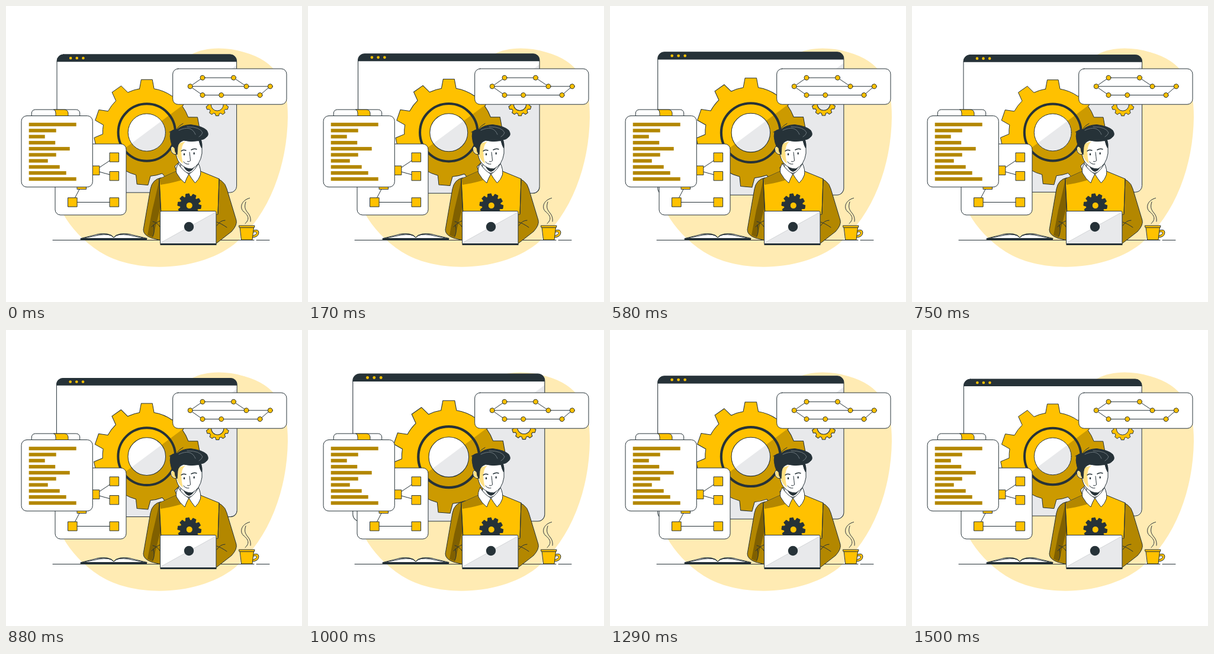
Animation, 500 px wide and 500 px high, one loop 1.54 s. Source, as an HTML page:

```html
<!DOCTYPE html>
<html lang="en">
<head>
<meta charset="utf-8">
<title>Developer at work</title>
<style>
html, body { margin: 0; width: 100%; height: 100%; overflow: hidden; background: #fff; }
svg { display: block; width: 100%; height: 100%; }
.ln { stroke: #263238; stroke-width: 1; stroke-linejoin: round; stroke-linecap: round; }
.w { fill: #fff; }
.y { fill: #ffc100; }
.o { fill: #b38700; }
.d { fill: #263238; }
.g { fill: #e8e9eb; }
.n { fill: none; }
</style>
</head>
<body>
<svg viewBox="0 0 500 500">
  <defs>
    <clipPath id="shade"><path d="M389.8 99.5L100 315.3H390z"/></clipPath>
  </defs>
  <path fill="#ffebb3" d="M313 82C335 70 368 68 402 78C456 93 477 128 476 188C475 268 446 352 386 402C326 449 218 453 158 415C130 397 109 373 97 352L200 150z"/>
  <path class="ln n" d="M79 395.5H419M423 395.5H445"/>

  <g id="window">
    <rect class="w" x="85.8" y="81.7" width="304" height="233.6" rx="11"/>
    <path class="g" d="M389.8 99.5L100 315.3H378.8a11 11 0 0 0 11-11z"/>
    <path class="d" d="M85.8 94V92.7a11 11 0 0 1 11-11H378.8a11 11 0 0 1 11 11V94z"/>
    <rect class="ln n" x="85.8" y="81.7" width="304" height="233.6" rx="11"/>
    <g class="y"><circle cx="109" cy="87.8" r="2.3"/><circle cx="119.6" cy="87.8" r="2.3"/><circle cx="130.3" cy="87.8" r="2.3"/></g>
    <path class="y" data-gear="big"/>
    <path fill="#cc9a00" data-gear="big" clip-path="url(#shade)"/>
    <path class="ln n" data-gear="big"/>
    <circle class="n" cx="237.8" cy="213.6" r="48.3" stroke="#263238" stroke-width="4"/>
    <circle class="w" cx="237.8" cy="213.6" r="31.7"/>
    <circle class="g" cx="237.8" cy="213.6" r="31.7" clip-path="url(#shade)"/>
    <circle class="ln n" cx="237.8" cy="213.6" r="31.7"/>
    <path class="ln y" data-gear="small"/>
    <circle class="ln g" cx="357" cy="166.5" r="10.5"/>
  </g>

  <g class="ln">
    <rect class="w" x="83" y="233" width="120" height="120" rx="9"/>
    <path class="n" d="M183 256L150 278L183 287M150 278L128 302L112.5 331.5H183"/>
    <g class="y" id="boxes"></g>
  </g>

  <g class="ln">
    <path class="w" d="M43.3 187V181a6 6 0 0 1 6-6H118.7a6 6 0 0 1 6 6V187z"/>
    <path class="y" d="M81 175H99a6 6 0 0 1 6 6V187H84V181Q84 176 81 175z"/>
    <rect class="w" x="26" y="185.5" width="120.3" height="120.3" rx="9"/>
  </g>
  <g class="o" id="bars"></g>

  <g class="ln">
    <rect class="w" x="281.7" y="106" width="192.3" height="60.2" rx="9"/>
    <path class="n" d="M446 135.8H311L332 121.2H384.5L406 135.8M311 135.8L332 150.5H429L446 135.8"/>
    <g class="y" id="nodes"></g>
  </g>

  <g class="ln">
    <path class="w" d="M127 392.5L153 386Q176 382 182 391Q188 382 211 386L238 392.5z"/>
    <path class="n" d="M132 392L157 387Q176 384 182 391Q188 384 207 387L232 392M154 385.5Q174 382 182 391Q190 382 210 385.5"/>
    <path class="d" d="M126.5 392.5H237.5V395H126.5z"/>
  </g>

  <g class="ln">
    <path class="y" d="M417 379.5Q427 375.5 427 383Q426 391 415.5 391L416 388Q422.5 387 423.3 383.5Q423 380 416.7 382.5z"/>
    <path class="y" d="M395.5 374H418.5L416 395H398z"/>
    <path class="y" d="M393.7 371H420L419.3 374.3H394.4z"/>
    <path class="n" d="M411.5 324.5C398 328 394 340 401 347C411 355 411 361 404 367.5M405 331C402 340 404 344 409 350C413 355 413.5 360 413 364"/>
  </g>

  <g class="ln">
    <path class="o" d="M262 290Q247 293 244 309L232 378Q232 387 246 392L262 396L275 330z"/>
    <path fill="#806000" stroke="none" d="M259 293Q252 325 247 345L239 387L248 391L261 340z"/>
    <path class="o" d="M345 288Q369 292 373 309L389 362Q391 370 381 381L354 402L348 340z"/>
    <path class="y" d="M259 292L290 278Q308 290 326 278L360 292L358 352H262z"/>
    <path class="o" stroke="none" d="M259.5 292L290 278L307 290Q292 297 261 302z"/>
    <path class="n" d="M259 292L262 350M360 292L358 350"/>
    <path class="n" d="M248 364Q256 366 260 373M246 373Q254 365 260 363M249 370Q252 382 248 389M370 362Q362 362 356 371M373 374Q363 367 356 365"/>
    <path class="d" data-gear="chest"/>
    <circle class="y" cx="309.8" cy="337" r="5.6"/>

    <path class="w" d="M297 256L294 276Q308 288 322 277L324 256z"/>
    <path class="d" d="M299 267Q309 274 320 266Q316 279 309 279.5Q302 278 299 267z"/>
    <path class="w" d="M291 266Q286 275 288 282Q294 293 302 299Q305 290 309 284Q297 277 291 266z"/>
    <path class="w" d="M325 266Q330 276 328.5 285Q326 293 319.5 299Q313 291 309 284Q320 277 325 266z"/>
    <path class="w" d="M287 238Q278 235 278.5 242Q279 250 287 251z"/>
    <path class="w" d="M288 222H329Q332 236 331 249Q328 269 314 275Q303 276 293 265Q287 257 287 246z"/>
    <path fill="#ffe083" stroke="none" d="M289 233L303 229Q292 238 299 266Q290 260 288 249zM287 239Q279.5 236 279.5 242Q280 249 287 250z"/>
    <path class="d" d="M278 212Q283 208 290 208Q297 201 312 200.5Q332 203 339 210Q343 216 340 220Q335 226 329 226Q332 232 330.5 240Q328 236 326 227.5Q312 230 300 227Q291 230 290 238L289 251Q285 247 285 240Q280 237 278.5 229Q276 220 278 212z"/>
    <path class="n" d="M276 213Q286 211 299 204M289 207Q292 202 299 198.5M281 210L279 214"/>
    <path fill="none" stroke="#8d979d" stroke-width=".7" d="M292 210Q313 200 320 217M306 204Q328 204 332 214Q331 218 326 221"/>
    <path class="n" d="M310 247Q311 255 311.5 261Q310 264 306.5 262.5M300 263Q303 268 309 267"/>
    <path class="n" stroke-width="1.5" d="M296 245Q299 242 304 244M313 243Q318 240 322 242"/>
    <ellipse class="d" stroke="none" cx="301" cy="250.5" rx="1.2" ry="2"/>
    <ellipse class="d" stroke="none" cx="317.7" cy="249" rx="1.2" ry="2"/>
  </g>

  <g>
    <rect class="w" x="260.5" y="346.5" width="94.5" height="56" rx="2"/>
    <path class="g" d="M355 348L261 400V402H355z"/>
    <path d="M355 348L261 400" stroke="#c4c8ca" stroke-width=".7"/>
    <rect class="ln n" x="260.5" y="346.5" width="94.5" height="56" rx="2"/>
    <rect class="d" x="260.5" y="401" width="95" height="3"/>
    <circle class="d" cx="309" cy="373" r="8.2"/>
  </g>
</svg>
<script>
const $ = id => document.getElementById(id);
const evenly = (n, first = 0) => Array.from({ length: n }, (_, i) => first + i * 360 / n);

// Angles are clockwise from the top; tip and base are half tooth widths.
function gearPath(cx, cy, outer, inner, tip, base, angles) {
  const at = (deg, r, w) => {
    const a = deg * Math.PI / 180, s = Math.sin(a), c = Math.cos(a);
    return `${(cx + r * s + w * c).toFixed(2)} ${(cy - r * c + w * s).toFixed(2)}`;
  };
  const teeth = angles.map((a, i) => {
    const next = angles[(i + 1) % angles.length];
    return `L${at(a, outer, -tip)}L${at(a, outer, tip)}L${at(a, inner, base)}` +
      `A${inner} ${inner} 0 0 1 ${at(next, inner, -base)}`;
  });
  return `M${at(angles[0], inner, -base)}${teeth.join('')}z`;
}

const gears = {
  big: gearPath(237.8, 213.2, 89, 73.5, 9.4, 12.3, [0, 44.5, 79.6, 115, 150, 184.7, 220, 258, 289, 325]),
  small: gearPath(357, 166.5, 19, 15.3, 2.5, 3.5, evenly(10)),
  chest: gearPath(309.8, 336.8, 19.7, 15, 2.9, 3.7, evenly(10, -10)),
};
document.querySelectorAll('[data-gear]').forEach(p => p.setAttribute('d', gears[p.dataset.gear]));

$('boxes').innerHTML = [[128, 302], [150.3, 277.7], [183, 255.6], [183, 287.2], [112.5, 331.5], [183, 331.5]]
  .map(([x, y]) => `<rect x="${x - 7.6}" y="${y - 7.6}" width="15.2" height="15.2"/>`).join('');
$('bars').innerHTML = [80, 46, 27, 44.5, 69, 46, 32, 52, 63, 80]
  .map((w, i) => `<rect x="38.7" y="${197.2 + i * 10.23}" width="${w}" height="6"/>`).join('');
$('nodes').innerHTML = [[332, 121.2], [384.5, 121.2], [311.2, 135.8], [406, 135.8], [446.3, 135.8], [332, 150.5], [363.7, 150.5], [429, 150.5]]
  .map(([x, y]) => `<circle cx="${x}" cy="${y}" r="4"/>`).join('');

// The CSS "ease" curve, solved by bisection.
function ease(x) {
  const bez = (p, q, u) => 3 * p * u * (1 - u) ** 2 + 3 * q * u * u * (1 - u) + u ** 3;
  let lo = 0, hi = 1;
  for (let i = 0; i < 20; i++) {
    const mid = (lo + hi) / 2;
    if (bez(.25, .25, mid) < x) lo = mid; else hi = mid;
  }
  return bez(.1, 1, lo);
}

const LOOP = 1540;
const SMALL = .989, LARGE = 1.088;
const turns = [-197, 118, 460, 838, 1180, 1530, 1876]; // alternately largest and smallest

function draw(now) {
  const t = now % LOOP;
  const i = turns.findIndex((start, k) => t < turns[k + 1]);
  const p = ease((t - turns[i]) / (turns[i + 1] - turns[i]));
  const scale = SMALL + (LARGE - SMALL) * (i % 2 ? p : 1 - p);
  $('window').setAttribute('transform', `translate(237.8 198.4) scale(${scale}) translate(-237.8 -198.4)`);
}
const begin = performance.now();
function tick() {
  draw(performance.now() - begin);
  requestAnimationFrame(tick);
}
tick();
</script>
</body>
</html>
```
